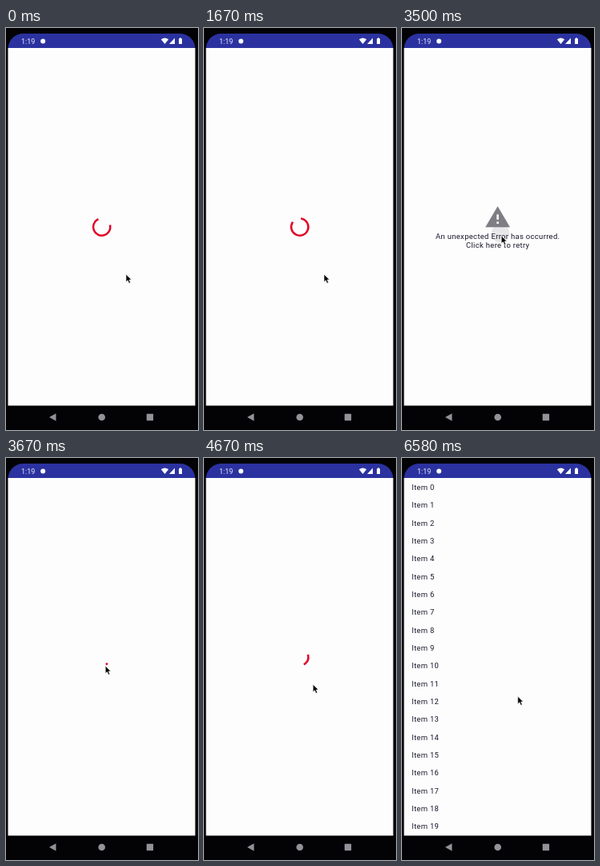
An HTML page for the animation above (6.66 s loop, 240 by 503 pixels).

```html
<!DOCTYPE html>
<html lang="en">
<head>
<meta charset="utf-8">
<title>Loading, error and retry</title>
<style>
  html, body { margin: 0; width: 100%; height: 100%; overflow: hidden; background: #030305; }
  svg { display: block; width: 240px; height: 503px; }
  text { font: 9.5px Roboto, sans-serif; letter-spacing: .3px; fill: #19192c; }
  .mid { text-anchor: middle; }
  .clock { font-size: 9px; letter-spacing: 0; fill: #e8eaf8; }
</style>
</head>
<body>
<svg viewBox="0 0 240 503">
  <rect width="240" height="503" fill="#030305"/>
  <path d="M2.5 26V26A19 19 0 0 1 21.5 7H217.5A19 19 0 0 1 236.5 26Z" fill="#2b32a0"/>
  <rect x="2.5" y="25" width="234" height="447.5" fill="#fdfdfe"/>

  <text class="clock" x="19" y="19.8">1:19</text>
  <g fill="#fff">
    <circle cx="46.2" cy="16.5" r="3"/>
    <path d="M193.8 14.2Q198.5 10.6 203.2 14.2L198.5 20Z"/>
    <path d="M204 20L211 12.6V20Z"/>
    <path d="M216 13.2H217.2V12.2H218.8V13.2H220V20H216Z"/>
  </g>

  <g fill="#929299">
    <path d="M54 487L62.5 482.2V491.8Z"/>
    <circle cx="119.7" cy="487" r="4.3"/>
    <rect x="175.7" y="482.8" width="8.4" height="8.4" rx=".6"/>
  </g>

  <path id="spin" fill="none" stroke="#e00428" stroke-width="2.5" stroke-linecap="square"/>

  <g id="error">
    <circle id="ripple" cx="123" cy="257" fill="#a0a0a8"/>
    <path d="M119.6 223L135 249.3H104.2Z" fill="#7e7e84"/>
    <path d="M118.3 233.2H120.9V239.8H118.3ZM118.3 242.2H120.9V245H118.3Z" fill="#fdfdfe"/>
    <text class="mid" x="119.7" y="263.6">An unexpected Error has occurred.</text>
    <text class="mid" x="119.7" y="275">Click here to retry</text>
  </g>

  <g id="list"></g>

  <path id="cursor" d="M0 0V9.6L2.2 7.6L3.8 11.2L5.6 10.4L4 6.9H6.9Z"
        fill="#000" stroke="#f6f6ee" stroke-width=".7"/>
</svg>
<script>
const LOOP = 6660, FPS = 12, TURN = 1332;
const ERROR_AT = 1910, PRESS_AT = 3410, RETRY_AT = 3660, LIST_AT = 5910;
const $ = id => document.getElementById(id);
const clamp = v => Math.min(1, Math.max(0, v));
const show = (id, on) => $(id).setAttribute("visibility", on ? "visible" : "hidden");

for (let i = 0; i < 20; i++) {
  const row = document.createElementNS("http://www.w3.org/2000/svg", "text");
  row.setAttribute("x", 12);
  row.setAttribute("y", 40 + i * 22.34);
  row.textContent = "Item " + i;
  $("list").append(row);
}

// cubic-bezier(.4, 0, .2, 1), solved by bisection
function ease(x) {
  let lo = 0, hi = 1, s = .5;
  for (let i = 0; i < 20; i++) {
    s = (lo + hi) / 2;
    const r = 1 - s;
    if (1.2 * r * r * s + .6 * r * s * s + s ** 3 < x) lo = s; else hi = s;
  }
  return 3 * (1 - s) * s * s + s ** 3;
}

// Indeterminate ring: the head runs out, then the tail catches up
function arc(age) {
  const p = age % TURN, turn = Math.floor(age / TURN);
  const base = -90 + turn * 216 + 286 * p / TURN;
  const head = 290 * ease(clamp(p / 666));
  const tail = 290 * ease(clamp((p - 666) / 666));
  const sweep = Math.max(head - tail, .5);
  const at = deg => {
    const a = deg * Math.PI / 180;
    return (119.7 + 10.7 * Math.cos(a)).toFixed(2) + " " + (249 + 10.7 * Math.sin(a)).toFixed(2);
  };
  const from = base + tail;
  return `M${at(from)}A10.7 10.7 0 ${sweep > 180 ? 1 : 0} 1 ${at(from + sweep)}`;
}

// Pointer stops: start, end, x, y
const moves = [[2830, 3400, 124.2, 260], [3660, 3900, 125.5, 264.3], [4420, 5080, 144.7, 298.2]];
function pointer(t) {
  let x = 150, y = 308.2;
  for (const [a, b, tx, ty] of moves) {
    const k = ease(clamp((t - a) / (b - a)));
    x += (tx - x) * k;
    y += (ty - y) * k;
  }
  return `translate(${x.toFixed(2)} ${y.toFixed(2)})`;
}

function draw(ms) {
  const t = Math.floor((ms % LOOP + 5) * FPS / 1000) * 1000 / FPS;
  const failed = t >= ERROR_AT && t < RETRY_AT;
  const done = t >= LIST_AT;
  show("error", failed);
  show("list", done);
  show("spin", !failed && !done);
  $("spin").setAttribute("d", arc(t < RETRY_AT ? t + 383 : t - 3667));
  const press = clamp((t - PRESS_AT) / 250);
  $("ripple").setAttribute("r", press ? 8 + 9 * press : 0);
  $("ripple").setAttribute("opacity", .22);
  $("cursor").setAttribute("transform", pointer(t));
}

const begin = performance.now();
function tick() {
  draw(performance.now() - begin);
  requestAnimationFrame(tick);
}
tick();
</script>
</body>
</html>
```
